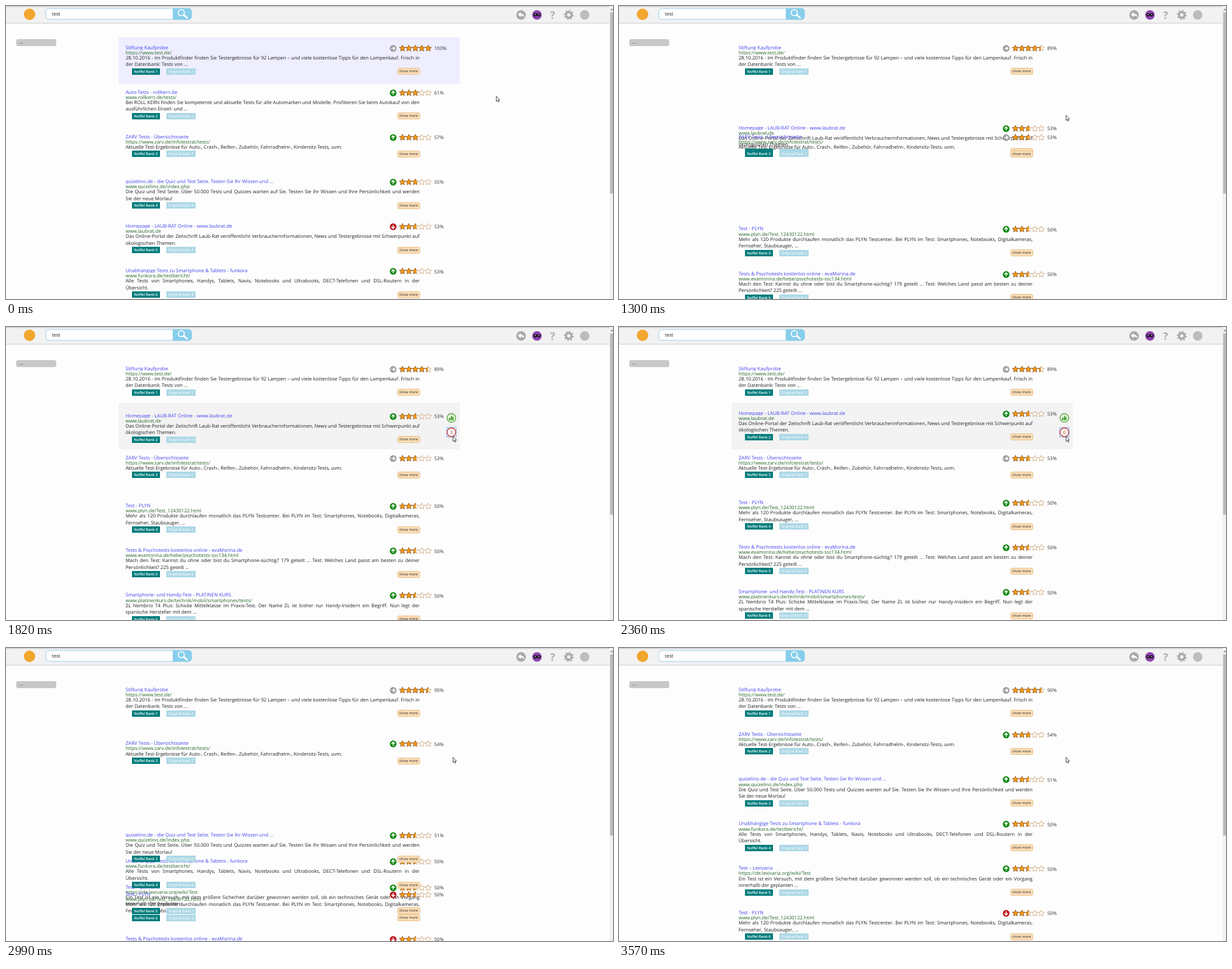
An HTML page that plays this animation: 954 px wide and 460 px high, repeating every 3.86 s.

```html
<!DOCTYPE html>
<html lang="de">
<head>
<meta charset="utf-8">
<title>Suchergebnisse</title>
<style>
  html, body { margin: 0; width: 100%; height: 100%; overflow: hidden; background: #fdfdfd; }
  body {
    position: relative; color: #222; white-space: nowrap;
    font: 7.6px/10.5px "Open Sans", "Noto Sans", sans-serif;
    text-rendering: geometricPrecision;
  }
  body > *, .item, .item > .side { position: absolute; }
  svg { position: absolute; display: block; }
  #chrome { left: 0; top: 0; }
  #query { left: 72px; top: 7.5px; }
  #filter { left: 16px; top: 51.5px; width: 58px; height: 11.5px; padding-left: 5px; background: #c8c8c8; border-radius: 3px; }
  .panel { left: 176.5px; width: 536.5px; height: 72.5px; }
  #fresh { top: 49px; background: #eef; }
  #hover { top: 119.2px; background: #f3f3f3; }
  #hover svg { left: 515px; top: 15px; }
  .item { left: 177px; width: 536px; height: 72px; }
  .title, .url { margin-left: 11px; height: 8.1px; overflow: hidden; }
  .title { margin-top: 11.5px; color: #4343ee; }
  .url { color: #276727; }
  .text { margin-left: 11px; width: 462px; }
  .text div:not(:last-child) { text-align-last: justify; }
  .ranks { position: relative; z-index: 1; height: 10px; font-size: 5.7px; line-height: 10px; text-align: center; color: #fff; }
  .ranks span { position: absolute; box-sizing: border-box; height: 10px; }
  .rank { left: 21px; width: 43.5px; background: #007c7c; font-weight: 600; }
  .was { left: 75px; width: 46px; background: #add8e6; }
  .ranks .more {
    left: 437.5px; top: -.5px; width: 36.5px; height: 11px; line-height: 9.5px;
    color: #333; background: #fadcb5; border: .8px solid #eac796; border-radius: 3px;
  }
  .pct { left: 496px; top: 12.8px; color: #333; }
  .stars { left: 441px; top: 11.5px; }
  .trend { left: 425.5px; top: 11.5px; }
</style>
</head>
<body>
<svg id="chrome" width="954" height="460">
  <rect width="954" height="27" fill="#f2f2f2"/>
  <path d="M0 .7H954" stroke="#d2d2d2" stroke-width="1.4"/>
  <path d="M0 27H949" stroke="#cbcbcb"/>
  <circle cx="37" cy="13" r="9" fill="#f2a62e"/>
  <rect x="62.5" y="4" width="229" height="17" rx="5" fill="#fff" stroke="#9fd0ea"/>
  <path d="M262 3.5h25a5 5 0 0 1 5 5v8a5 5 0 0 1-5 5h-25z" fill="#87ceeb"/>
  <g fill="none" stroke="#fff" stroke-linecap="round">
    <circle cx="275.5" cy="10.5" r="4.8" stroke-width="1.6"/>
    <path d="M279.5 14l5 4.5" stroke-width="2.6"/>
  </g>
  <g fill="#a9a9a9">
    <circle cx="809.5" cy="14" r="7.5"/>
    <path d="M804.5 13.5l4.5-4v2.5q5.500 0 5.500 5.500q-1.500-2.500-5.500-2.500v2.500z" fill="#fff"/>
    <circle cx="834.5" cy="14" r="7.5" fill="#8e44ad"/>
    <path d="M829 12q2.8-1.2 5.5 0q2.7-1.2 5.5 0q.3 4.5-3 4.5q-1.5 0-2.5-1.7q-1 1.7-2.5 1.7q-3.3 0-3-4.5z" fill="#160d1c"/>
    <path d="M830.8 13.6h2M836.2 13.6h2" stroke="#fff"/>
    <text x="859" y="20" font-size="16" font-weight="700" text-anchor="middle">?</text>
    <circle cx="884.5" cy="14" r="4.3" fill="none" stroke="#a9a9a9" stroke-width="3.2"/>
    <circle cx="884.5" cy="14" r="6.7" fill="none" stroke="#a9a9a9" stroke-width="2" stroke-dasharray="2.631"/>
    <circle cx="909.5" cy="14" r="7.5" fill="#bdbdbd"/>
  </g>
  <rect x="948.5" width="5.5" height="460" fill="#f1f1f1"/>
  <rect x="949.5" y="10" width="4.5" height="284.5" fill="#b9b9b9"/>
  <path d="M950 6.5l2-2.5l2 2.5z" fill="#777"/>
</svg>
<div id="query">test</div>
<div id="filter">...</div>
<div id="fresh" class="panel"></div>
<div id="hover" class="panel">
  <svg width="20" height="50">
    <defs><path id="thumb" d="M-4-.3h2v4h-2zM-1.5-.3L.3-4q1.5 0 1 2.8h2.5l-.7 4.9h-4.6z"/></defs>
    <g transform="translate(8 8.8)">
      <circle r="6.8" fill="#e9f6e2" stroke="#5aa845" stroke-width="1.3"/>
      <use href="#thumb" fill="#55a83f"/>
    </g>
    <g transform="translate(8 31.3)">
      <rect id="focus" x="-7.5" y="-7.5" width="15" height="15" fill="#e4effb" stroke="#7aaee6" stroke-width=".8"/>
      <circle r="6.8" fill="#fff" stroke="#cf3f3f" stroke-width="1.4"/>
      <use id="down" href="#thumb" fill="#cf3f3f" transform="rotate(180)"/>
      <text id="count" y="2.6" font-size="7" font-weight="600" text-anchor="middle" fill="#cf5050"></text>
    </g>
  </svg>
</div>
<svg id="cursor" width="8" height="12" style="z-index:2">
  <path d="M.6.6v8l1.8-1.6l1.2 2.8l1.3-.6l-1.2-2.6h2.4z" fill="#fff" stroke="#2b2b3a" stroke-width=".8"/>
</svg>
<script>
const LOOP = 3860, TOP = 49, PITCH = 70.15, GLIDE = 1060;
const $ = id => document.getElementById(id);
const clamp = v => Math.min(1, Math.max(0, v));

// title, address, engine rank, text lines
const pages = {
  shop: ['Stiftung Kaufprobe', 'https://www.test.de/', 1,
    '28.10.2016 - Im Produktfinder finden Sie Testergebnisse für 92 Lampen – und viele kostenlose Tipps für den Lampenkauf. Frisch in',
    'der Datenbank: Tests von ...'],
  cars: ['Auto-Tests - rollkern.de', 'www.rollkern.de/tests/', 3,
    'Bei ROLL KERN finden Sie kompetente und aktuelle Tests für alle Automarken und Modelle. Profitieren Sie beim Autokauf von den',
    'ausführlichen Einzel- und ...'],
  club: ['ZARV Tests - Übersichtsseite', 'https://www.zarv.de/infotestrat/tests/', 7,
    'Aktuelle Test-Ergebnisse für Auto-, Crash-, Reifen-, Zubehör, Fahrradhelm-, Kindersitz-Tests, uvm.'],
  quiz: ['quizelino.de - die Quiz und Test Seite. Testen Sie Ihr Wissen und ...', 'www.quizelino.de/index.php', 9,
    'Die Quiz und Test Seite. Über 50.000 Tests und Quizzes warten auf Sie. Testen Sie Ihr Wissen und Ihre Persönlichkeit und werden',
    'Sie der neue Morlau!'],
  eco: ['Homepage - LAUB-RAT Online - www.laubrat.de', 'www.laubrat.de', 4,
    'Das Online-Portal der Zeitschrift Laub-Rat veröffentlicht Verbraucherinformationen, News und Testergebnisse mit Schwerpunkt auf',
    'ökologischen Themen.'],
  phone: ['Unabhängige Tests zu Smartphone &amp; Tablets - funkora', 'www.funkora.de/testbericht/', 8,
    'Alle Tests von Smartphones, Handys, Tablets, Navis, Notebooks und Ultrabooks, DECT-Telefonen und DSL-Routern in der',
    'Übersicht.'],
  wiki: ['Test – Lexivaria', 'https://de.lexivaria.org/wiki/Test', 5,
    'Ein Test ist ein Versuch, mit dem größere Sicherheit darüber gewonnen werden soll, ob ein technisches Gerät oder ein Vorgang',
    'innerhalb der geplanten ...'],
  tech: ['Test - PLYN', 'www.plyn.de/Test_12430122.html', 2,
    'Mehr als 120 Produkte durchlaufen monatlich das PLYN Testcenter. Bei PLYN im Test: Smartphones, Notebooks, Digitalkameras,',
    'Fernseher, Staubsauger, ...'],
  psych: ['Tests &amp; Psychotests kostenlos online - evaMorina.de', 'www.evamorina.de/liebe/psychotests-ssc134.html', 6,
    'Mach den Test: Kannst du ohne oder bist du Smartphone-süchtig? 179 geteilt ... Test: Welches Land passt am besten zu deiner',
    'Persönlichkeit? 225 geteilt ...'],
  handy: ['Smartphone- und Handy-Test - PLATINEN KURS', 'www.platinenkurs.de/technik/mobil/smartphones/tests/', 10,
    'ZL Nembrio T4 Plus: Schicke Mittelklasse im Praxis-Test. Der Name ZL ist bisher nur Handy-Insidern ein Begriff. Nun legt der',
    'spanische Hersteller mit dem ...'],
};

// start time, then per rank: page, percent, trend, previous position
const rankings = [
  [0, [['shop', 100, 'same', 0], ['cars', 61, 'up', 1], ['club', 57, 'up', 2],
    ['quiz', 55, 'up', 3], ['eco', 53, 'down', 4], ['phone', 53, 'up', 5]]],
  [900, [['shop', 89, 'same', 0], ['eco', 53, 'up', 4], ['club', 53, 'same', 2],
    ['tech', 50, 'up', 7], ['psych', 50, 'up', 8], ['handy', 50, 'up', 9],
    ['wiki', 50, 'down', 6], ['phone', 50, 'down', 5], ['quiz', 50, 'down', 3]]],
  [2527, [['shop', 90, 'same', 0], ['club', 54, 'up', 2], ['quiz', 51, 'up', 8],
    ['phone', 50, 'up', 7], ['wiki', 50, 'up', 6], ['tech', 50, 'down', 3],
    ['psych', 50, 'down', 4], ['handy', 50, 'down', 5]]],
];

// vote panel: null is hidden, '' is idle, a digit is the countdown
const votes = [[0, null], [340, ''], [600, '3'], [690, '2'], [820, '1'], [900, null],
  [1740, ''], [1810, '3'], [1880, '2'], [1950, '1'], [2360, '0'], [2527, null]];

const trends = { same: ['#999', 0], up: ['#0a860a', -90], down: ['#b80f16', 90] };

const starPath = Array.from({ length: 5 }, (_, n) =>
  'M' + Array.from({ length: 10 }, (_, k) => {
    const a = (k * 36 - 90) * Math.PI / 180, r = k % 2 ? 2.3 : 5;
    return [5.1 + 10.15 * n + r * Math.cos(a), 5.5 + r * Math.sin(a)].map(v => v.toFixed(2));
  }).join('L') + 'Z').join('');

const stars = (width, fill, stroke) =>
  `<svg class="stars" width="${width}" height="11"><path d="${starPath}" fill="${fill}" stroke="${stroke}" stroke-width=".8"/></svg>`;

function itemHtml([page, pct, trend], i) {
  const [title, url, was, ...lines] = pages[page];
  const [color, turn] = trends[trend];
  return `<div class="item">
    <div class="title">${title}</div><div class="url">${url}</div>
    <div class="text">${lines.map(l => `<div>${l}</div>`).join('')}</div>
    <div class="ranks"><span class="rank">Noffel Rank ${i + 1}</span><span class="was">Original Rank ${was}</span><span class="more">show more</span></div>
    <svg class="trend" width="11" height="11"><g transform="translate(5.5 5.5) rotate(${turn})">
      <circle r="5.2" fill="${color}"/><path d="M-3 0H2.6M0-2.8L2.8 0L0 2.8" fill="none" stroke="#fff" stroke-width="1.5"/></g></svg>
    ${stars(51, '#fff', '#c9a074')}${stars(51 * pct / 100, '#fb9a12', '#8f5a1c')}
    <div class="side pct">${pct}%</div></div>`;
}

const layers = rankings.map(([, order]) => {
  const layer = document.createElement('div');
  layer.style.cssText = 'left:0;top:0';
  layer.innerHTML = order.map(itemHtml).join('');
  document.body.append(layer);
  return layer;
});

const indexAt = (list, t) => list.findLastIndex(([start]) => start <= t);

function draw() {
  const t = performance.now() % LOOP;

  const now = indexAt(rankings, t), [start, order] = rankings[now];
  const u = clamp((t - start) / GLIDE), rest = (1 - u) * Math.exp(-2.25 * u);
  layers.forEach((layer, i) => layer.style.display = i === now ? '' : 'none');
  order.forEach(([, , , from], i) => {
    layers[now].children[i].style.top = TOP + PITCH * (i + (from - i) * rest) + 'px';
  });

  const vote = votes[indexAt(votes, t)][1];
  $('hover').style.display = vote === null ? 'none' : '';
  $('focus').style.display = vote ? '' : 'none';
  $('down').style.display = vote ? 'none' : '';
  $('count').textContent = vote || '';

  $('fresh').style.opacity = 1 - clamp((t - 70) / 430);
  const m = clamp((t - 70) / 360), move = m * m * (3 - 2 * m);
  $('cursor').style.left = 770 - 67.7 * move + 'px';
  $('cursor').style.top = 140.7 + 30 * move + 'px';
  requestAnimationFrame(draw);
}
draw();
</script>
</body>
</html>
```
